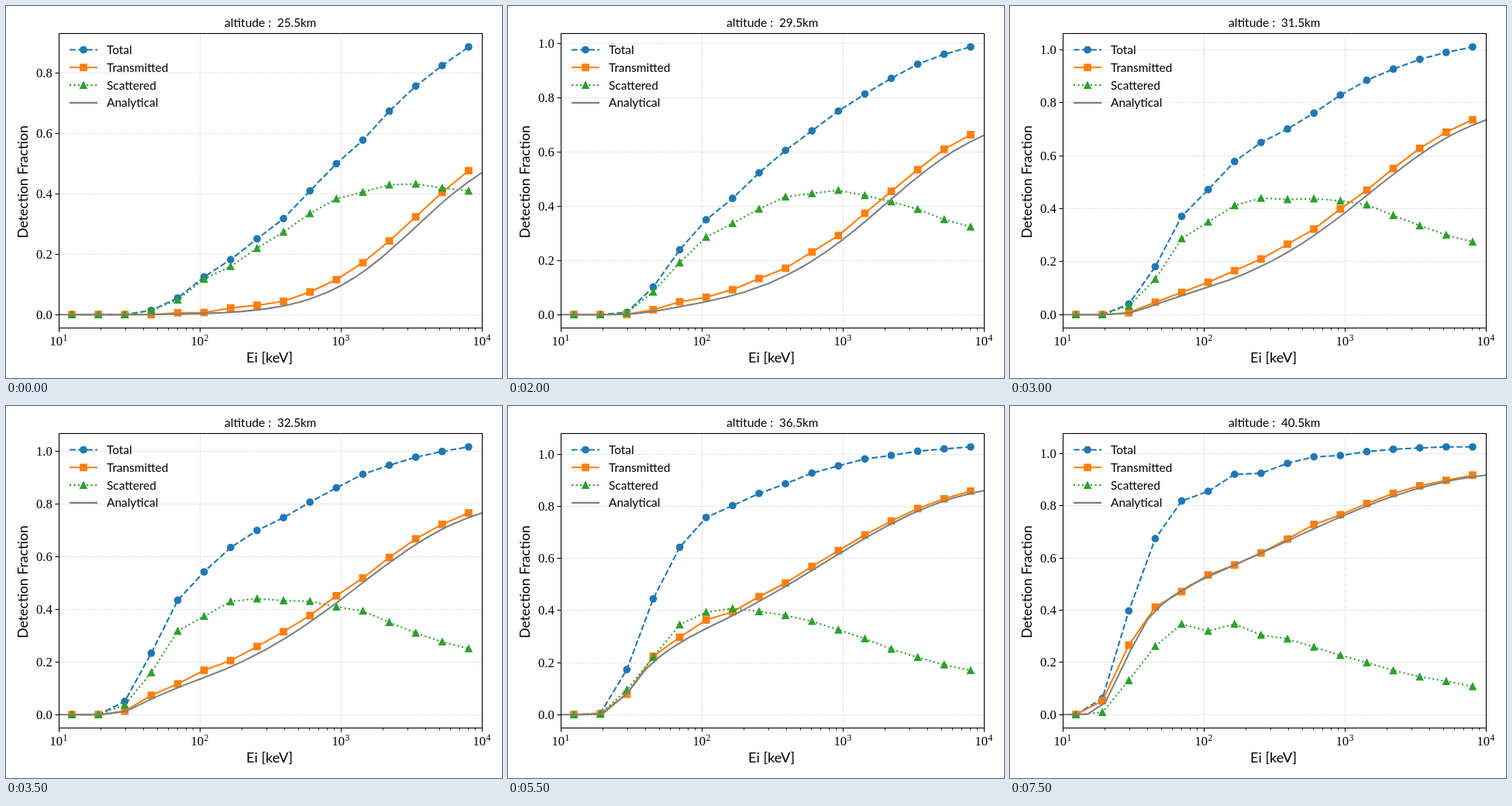
An HTML page with a canvas that plays this animation: 640x480 px, repeating every 8000 ms.

```html
<!DOCTYPE html>
<html lang="en">
<head>
<meta charset="utf-8">
<title>Detection fraction by altitude</title>
<style>
html, body { margin: 0; width: 100%; height: 100%; overflow: hidden; background: #fff; }
canvas { display: block; width: 640px; height: 480px; }
</style>
</head>
<body>
<canvas id="plot" width="640" height="480"></canvas>
<script>
const ctx = document.getElementById('plot').getContext('2d');
const LEFT = 68, RIGHT = 614, TOP = 35.5, BOTTOM = 415.5;
const PLOT_H = (BOTTOM - TOP) / 1.1, ZERO = BOTTOM - PLOT_H / 20;
const STEPS = 16, STEP_MS = 500, BINS = 16;
const BLUE = '#1f77b4', ORANGE = '#ff7f0e', GREEN = '#2ca02c', GRAY = '#7f7f7f';
const SANS = 'Lato, "Open Sans", sans-serif', SERIF = '"Liberation Serif", serif';

// Simulated fractions in thousandths at key altitudes; the lowest bin is always empty.
const keys = [0, 2, 4, 6, 9, 13, 15];
const transmitted = [
  [0, 0, 0, 6, 7, 22, 31, 44, 75, 116, 172, 244, 324, 405, 477],
  [0, 0, 6, 13, 30, 46, 66, 103, 137, 199, 268, 350, 437, 513, 575],
  [0, 1, 18, 47, 64, 92, 133, 171, 231, 292, 374, 455, 535, 610, 664],
  [0, 7, 47, 84, 122, 166, 210, 266, 323, 399, 470, 552, 628, 689, 736],
  [0, 36, 140, 197, 271, 290, 361, 413, 483, 551, 613, 679, 738, 783, 819],
  [12, 140, 315, 398, 453, 499, 541, 594, 649, 701, 758, 801, 838, 868, 892],
  [53, 266, 412, 471, 535, 573, 619, 672, 728, 765, 808, 847, 876, 897, 917]
];
const scattered = [
  [0, 0, 14, 49, 118, 160, 220, 274, 335, 384, 406, 430, 433, 420, 410],
  [0, 1, 35, 105, 185, 268, 323, 363, 416, 440, 456, 435, 419, 396, 377],
  [0, 7, 84, 192, 286, 337, 390, 435, 447, 459, 440, 417, 389, 351, 324],
  [0, 33, 134, 287, 350, 412, 440, 435, 438, 430, 415, 375, 336, 301, 275],
  [0, 48, 205, 355, 404, 440, 422, 421, 407, 366, 345, 301, 262, 231, 206],
  [6, 140, 232, 329, 367, 367, 362, 334, 305, 283, 240, 205, 181, 156, 137],
  [9, 131, 262, 347, 320, 347, 305, 290, 259, 227, 199, 169, 145, 128, 108]
];

// Photon attenuation in air: energy (keV), coefficient (cm2/g).
const attenuation = [
  [10, 5.12], [15, 1.5], [20, .73], [30, .335], [40, .238], [50, .205],
  [60, .187], [80, .1662], [100, .1541], [150, .1356], [200, .1233],
  [300, .1067], [400, .0955], [500, .0871], [600, .0806], [800, .0707],
  [1000, .0636], [1250, .0569], [1500, .0518], [2000, .0445], [3000, .0358],
  [4000, .0308], [5000, .0275], [6000, .0252], [8000, .0223], [10000, .02045]
];
const depth = k => Math.exp(3.608 - .153 * k + .00058 * k * k);

const xOf = energy => LEFT + (Math.log10(energy) - 1) * (RIGHT - LEFT) / 3;
const binX = i => LEFT + (i + .5) * (RIGHT - LEFT) / BINS;
const snap = v => Math.floor(v) + .5;

// Cubic Hermite interpolation between the key altitudes.
function sample(rows, k) {
  const last = keys.length - 1;
  let j = 0;
  while (j < last - 1 && k >= keys[j + 1]) j++;
  const h = keys[j + 1] - keys[j], u = (k - keys[j]) / h;
  const slope = (n, i) => {
    const a = Math.max(0, n - 1), b = Math.min(last, n + 1);
    return (rows[b][i] - rows[a][i]) / (keys[b] - keys[a]);
  };
  const values = rows[j].map((p, i) => {
    const d = rows[j + 1][i] - p, m = slope(j, i) * h, n = slope(j + 1, i) * h;
    const v = p + u * (m + u * (3 * d - 2 * m - n + u * (m + n - 2 * d)));
    return Math.max(0, v) / 1000;
  });
  return [0, ...values];
}

function path(points, color, width, dash = []) {
  ctx.beginPath();
  points.forEach(([x, y]) => ctx.lineTo(x, y));
  ctx.strokeStyle = color;
  ctx.lineWidth = width;
  ctx.lineJoin = 'round';
  ctx.setLineDash(dash);
  ctx.stroke();
  ctx.setLineDash([]);
}

function text(str, x, y, size, family, align = 'left') {
  ctx.font = `${size}px ${family}`;
  ctx.textAlign = align;
  ctx.fillStyle = '#000';
  ctx.fillText(str, x, y);
}

const markers = {
  circle(x, y) {
    ctx.beginPath();
    ctx.arc(x, y, 4.86, 0, 2 * Math.PI);
    ctx.fill();
  },
  square(x, y) {
    ctx.fillRect(x - 4.86, y - 4.86, 9.72, 9.72);
  },
  triangle(x, y) {
    ctx.beginPath();
    ctx.moveTo(x, y - 4.17);
    ctx.lineTo(x - 4.17, y + 4.17);
    ctx.lineTo(x + 4.17, y + 4.17);
    ctx.closePath();
    ctx.fill();
    ctx.lineWidth = 1.39;
    ctx.lineJoin = 'miter';
    ctx.stroke();
  }
};

const styles = [
  { name: 'Total', color: BLUE, dash: [7.7, 3.33], marker: 'circle' },
  { name: 'Transmitted', color: ORANGE, dash: [], marker: 'square' },
  { name: 'Scattered', color: GREEN, dash: [2.08, 3.44], marker: 'triangle' },
  { name: 'Analytical', color: GRAY, dash: [] }
];

function series(points, { color, dash, marker }, marked = points) {
  path(points, color, 2.08, dash);
  if (!marker) return;
  ctx.fillStyle = ctx.strokeStyle = color;
  marked.forEach(([x, y]) => markers[marker](x, y));
}

function axes(yOf, top) {
  const grid = (a, b) => path([a, b], 'rgba(176,176,176,.7)', 1.1, [1.1, 1.83]);
  for (let d = 1; d <= 4; d++) {
    const x = snap(xOf(10 ** d));
    grid([x, BOTTOM], [x, TOP]);
    path([[x, BOTTOM], [x, BOTTOM + 5]], '#000', 1.1);
    text('10', x - 12, 437.5, 16.6, SERIF);
    text(d, x + 5, 431.5, 11.6, SERIF);
    for (let n = 2; n < 10 && d < 4; n++) {
      const mx = snap(xOf(n * 10 ** d));
      path([[mx, BOTTOM], [mx, BOTTOM + 3]], '#000', .83);
    }
  }
  for (let n = 0; n / 5 < top * 1.05; n++) {
    const y = snap(yOf(n / 5));
    grid([LEFT, y], [RIGHT, y]);
    path([[LEFT + .5, y], [LEFT - 4.5, y]], '#000', 1.1);
    text((n / 5).toFixed(1), 59.7, y + 5.3, 16.6, SERIF, 'right');
  }
}

function labels(k) {
  text('altitude :', 282, 27, 15.6, SANS);
  text(`${(25.5 + k).toFixed(1)}km`, 350, 27, 15.2, SANS);
  text('Ei [keV]', 340, 460, 18.2, SANS, 'center');
  ctx.save();
  ctx.translate(28, 227);
  ctx.rotate(-Math.PI / 2);
  text('Detection Fraction', 0, 0, 17.7, SANS, 'center');
  ctx.restore();
  styles.forEach((style, i) => {
    const y = 56.5 + i * 22.8;
    series([[82, y], [118, y]], style, [[100, y]]);
    text(style.name, 130, y + 5.5, 15.4, SANS);
  });
}

function draw(k) {
  const trans = sample(transmitted, k), scat = sample(scattered, k);
  const total = trans.map((v, i) => v + scat[i]);
  const top = Math.max(...total);
  const yOf = v => ZERO - v * PLOT_H / top;

  ctx.fillStyle = '#fff';
  ctx.fillRect(0, 0, 640, 480);
  axes(yOf, top);

  ctx.save();
  ctx.beginPath();
  ctx.rect(LEFT, TOP, RIGHT - LEFT, BOTTOM - TOP);
  ctx.clip();
  [total, trans, scat].forEach((values, i) =>
    series(values.map((v, n) => [binX(n), yOf(v)]), styles[i]));
  series(attenuation.map(([e, mu]) => [xOf(e), yOf(Math.exp(-mu * depth(k)))]), styles[3]);
  ctx.restore();

  ctx.strokeStyle = '#000';
  ctx.lineWidth = 1.1;
  ctx.lineJoin = 'miter';
  ctx.strokeRect(LEFT + .5, TOP, RIGHT - LEFT, BOTTOM - TOP);
  labels(k);
}

const start = performance.now();
function tick() {
  draw(Math.floor((performance.now() - start) / STEP_MS) % STEPS);
  requestAnimationFrame(tick);
}
tick();
</script>
</body>
</html>
```
